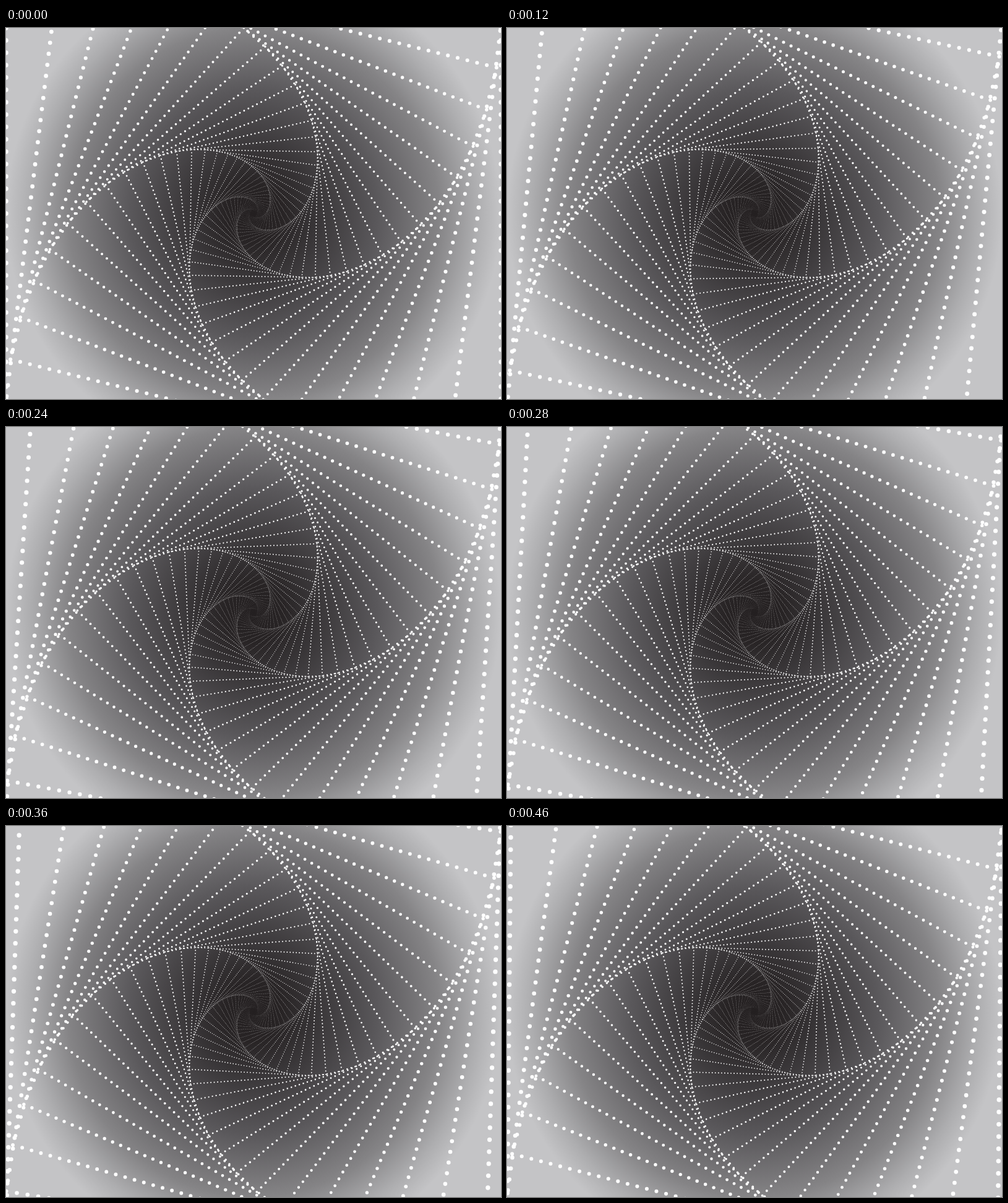
Animation, 800 px wide and 600 px high, one loop 480 ms. Source, as an HTML page with a canvas:

```html
<!DOCTYPE html>
<html lang="en">
<head>
<meta charset="utf-8">
<title>Dotted square spiral</title>
<style>
  html, body { margin: 0; width: 100%; height: 100%; overflow: hidden; background: #c4c4c6; }
  canvas { display: block; }
</style>
</head>
<body>
<canvas id="stage" width="800" height="600"></canvas>
<script>
const ctx = document.getElementById('stage').getContext('2d');
const W = 800, H = 600, CX = W / 2, CY = H / 2;
const LOOP = 480, TICK = 20, STEPS = 25;
const SQUARES = 42, SHRINK = 0.9, TURN = 7 * Math.PI / 180;
const HALF = 400, GAPS = 40, DOT = 3.75;

const backdrop = ctx.createRadialGradient(CX, CY, 0, CX, CY, 400);
[[0, '#231f20'], [0.12, '#282425'], [0.25, '#383537'], [0.5, '#5a585b'],
 [0.75, '#858486'], [0.9, '#adadaf'], [1, '#c4c4c6']]
  .forEach(([at, color]) => backdrop.addColorStop(at, color));

// depth 0 is the upright 800 px square; deeper ones shrink and turn
function drawSquare(depth) {
  const scale = SHRINK ** depth;
  const half = HALF * scale, gap = 2 * half / GAPS, r = DOT * scale;
  const cos = Math.cos(TURN * depth), sin = Math.sin(TURN * depth);
  ctx.beginPath();
  for (let i = 0; i < GAPS; i++) {
    let u = -half, v = -half + i * gap;
    for (let side = 0; side < 4; side++) {
      const x = CX + u * cos - v * sin;
      const y = CY + u * sin + v * cos;
      if (x > -r && x < W + r && y > -r && y < H + r) {
        ctx.moveTo(x + r, y);
        ctx.arc(x, y, r, 0, 2 * Math.PI);
      }
      [u, v] = [-v, u];
    }
  }
  ctx.fill();
}

function draw(ms) {
  const phase = Math.floor((ms % LOOP) / TICK) / STEPS;
  ctx.fillStyle = backdrop;
  ctx.fillRect(0, 0, W, H);
  ctx.fillStyle = '#fff';
  for (let k = -1; k < SQUARES; k++) drawSquare(k - phase);
}

let start;
function frame(now) {
  start ??= now;
  draw(Math.max(0, now - start));
  requestAnimationFrame(frame);
}
draw(0);
requestAnimationFrame(frame);
</script>
</body>
</html>
```
